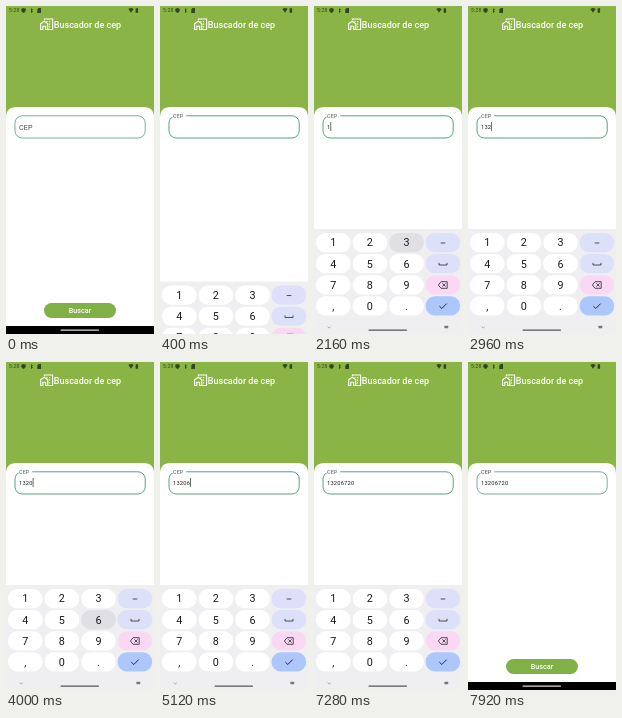
An HTML page for the animation above (8000 ms loop, 148 by 328 pixels).

```html
<!DOCTYPE html>
<html lang="pt-BR">
<head>
<meta charset="utf-8">
<title>Buscador de cep</title>
<style>
html, body { margin: 0; width: 100%; height: 100%; overflow: hidden; background: #fff; }
svg { display: block; width: 100%; height: 100%; }
text { font-family: Roboto, sans-serif; }
</style>
</head>
<body>
<svg viewBox="0 0 148 328">
  <rect width="148" height="328" fill="#8ab446"/>

  <g fill="#34451f">
    <text x="3" y="6.2" font-size="5" letter-spacing=".2">5:28</text>
    <path d="M15.3 2.8L17.5 2L19.7 2.8V4.6Q19.5 6.2 17.5 7Q15.5 6.2 15.3 4.6Z"/>
    <path d="M25 2.2L27 3.6L25.6 4.5L27 5.6L25 7Z"/>
    <path d="M31.3 3.4L32.6 2H35V7H31.3Z"/>
    <path d="M122.4 3Q125 1.2 127.6 3L125 6.8Z"/>
    <rect x="129.6" y="2.2" width="2.5" height="4.6" rx=".5"/>
  </g>

  <g fill="none" stroke="#fff" stroke-width="1.1">
    <path d="M34.6 23.5V17.8L38.2 15.2L41.8 17.8V23.5H39.6V20.2H36.8V23.5Z"/>
    <path d="M38.4 14.2V13H46.6V23.5H42"/>
    <path d="M43.6 15V16.2M43.6 17.6V18.8M43.6 20.2V21.4M41 15V16"/>
  </g>
  <text x="47.8" y="22" font-size="9" font-weight="500" fill="#fff" textLength="">Buscador de cep</text>

  <path d="M0 320V111.5Q0 101 10.5 101H137.5Q148 101 148 111.5V320Z" fill="#fff"/>
  <rect id="box" x="9" y="109.8" width="130.2" height="22.2" rx="7.2" fill="#fff"/>
  <rect id="gap" x="11.8" y="108.8" height="2" fill="#fff"/>
  <text id="label" x="0" y="0" font-size="7.2" letter-spacing=".18">CEP</text>
  <text id="value" x="13" y="123.1" font-size="5.76" letter-spacing=".18" fill="#1c1b1f"></text>
  <rect id="caret" y="116" width=".8" height="9" fill="#34513c"/>

  <rect x="38" y="297" width="72" height="15" rx="7.5" fill="#80b046"/>
  <text x="74" y="307.1" font-size="7.2" font-weight="500" fill="#fff" text-anchor="middle">Buscar</text>
  <rect y="320" width="148" height="8" fill="#000"/>
  <rect x="54.5" y="323.6" width="38.5" height="1.2" rx=".6" fill="#dcdcdc"/>

  <g id="board">
    <rect y="223" width="148" height="105" fill="#efeff2"/>
    <g id="keys" font-size="10.8" text-anchor="middle" fill="#1b1b1f"></g>
    <g fill="none" stroke="#25262b" stroke-width=".8">
      <path d="M126.7 237H131.3"/>
      <path d="M125 256.8V259H133V256.8"/>
      <path d="M124.4 279L127 275.7H133.2V282.3H127ZM128.4 277.4L131.6 280.6M131.6 277.4L128.4 280.6"/>
      <path d="M125.4 300.2L127.8 302.5L132.7 297.6" stroke-width="1"/>
    </g>
    <path d="M13.6 320.6L15.2 322L16.8 320.6" fill="none" stroke="#777" stroke-width=".6"/>
    <rect x="130.4" y="319.8" width="3.8" height="2.4" rx=".4" fill="#777"/>
    <rect x="54.5" y="323.6" width="38.5" height="1.2" rx=".6" fill="#55565a"/>
  </g>
</svg>
<script>
const LOOP = 8000, CODE = '13206720';
const $ = id => document.getElementById(id);
const set = (el, attrs) => { for (const k in attrs) el.setAttribute(k, attrs[k]); };
const clamp = x => Math.min(1, Math.max(0, x));
const span = (t, a, b) => clamp((t - a) / (b - a));
const easeOut = x => 1 - (1 - x) ** 3;
const smooth = x => x * x * (3 - 2 * x);

// One entry per key: pressed, released, typed (ms)
const presses = [
  [1360, 1600, 1760], [2160, 2320, 2320], [2800, 2960, 2960], [3440, 3600, 3600],
  [4000, 4080, 4080], [5440, 5600, 5520], [5920, 6000, 6000], [6560, 6720, 6640]
].map(([down, up, typed], i) => ({ key: CODE[i], down, up, typed }));
const taps = [...presses, { key: 'ok', down: 7120, up: 7280 }];

const colX = [2, 38.7, 75.3, 111.6];
const keys = {};
function addKey(name, col, row, fill, label) {
  const add = (tag, attrs) => {
    const el = document.createElementNS('http://www.w3.org/2000/svg', tag);
    set(el, attrs);
    return $('keys').appendChild(el);
  };
  const y = 227 + row * 21.1;
  const rect = add('rect', { x: colX[col], y, width: 34.5, height: 19.2, rx: 9.2, fill });
  if (label) add('text', { x: colX[col] + 17.2, y: y + 13.4 }).textContent = label;
  keys[name] = { rect, fill };
}
['123', '456', '789', ',0.'].forEach((line, row) =>
  [...line].forEach((c, col) => addKey(c, col, row, '#ffffff', c)));
addKey('minus', 3, 0, '#dce1f9');
addKey('space', 3, 1, '#dce1f9');
addKey('del', 3, 2, '#fad8f4');
addKey('ok', 3, 3, '#adc6fc');

function draw(t) {
  const float = smooth(span(t, 200, 390));
  const focused = t >= 240 && t < 7360;
  set($('box'), { stroke: focused ? '#459a70' : '#518f83', 'stroke-width': focused ? .9 : .75 });
  set($('gap'), { width: 14.4 * float });
  set($('label'), {
    transform: `translate(13 ${123.7 - 11.9 * float}) scale(${1 - .25 * float})`,
    fill: focused ? '#58605a' : '#49454f'
  });

  const typed = presses.filter(p => t >= p.typed);
  $('value').textContent = CODE.slice(0, typed.length);
  const last = typed.length ? typed[typed.length - 1].typed : 1120;
  const blink = typed.length ? Math.floor((t - last) / 520) % 2 === 0 : true;
  const shown = t >= 1120 && t < 7120 && blink;
  set($('caret'), { x: 13 + 3.42 * typed.length, opacity: shown ? 1 : 0 });

  for (const name in keys) {
    const down = taps.some(p => p.key === name && t >= p.down && t < p.up);
    set(keys[name].rect, { fill: down ? (name === 'ok' ? '#98b2e8' : '#dfdfe4') : keys[name].fill });
  }

  const open = easeOut(span(t, 300, 790)) * (1 - smooth(span(t, 7350, 7850)));
  set($('board'), { transform: `translate(0 ${105 * (1 - open)})`, opacity: open > 0 ? 1 : 0 });
}

const start = performance.now();
function tick() {
  draw((performance.now() - start) % LOOP);
  requestAnimationFrame(tick);
}
tick();
</script>
</body>
</html>
```
